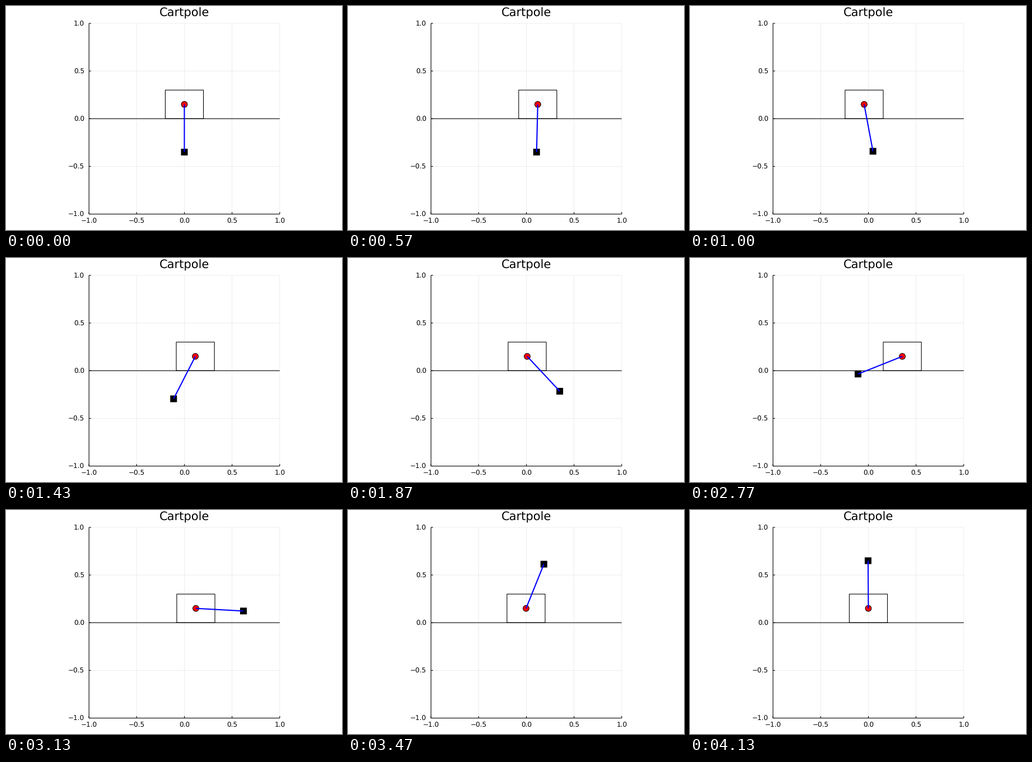
Recreate the animation shown at these times as a matplotlib script. Size 600 by 400 pixels, loop 4160 ms.

```python
import numpy as np
import matplotlib.pyplot as plt
from matplotlib.animation import FuncAnimation
from matplotlib.patches import Circle, Rectangle

plt.rcParams.update({"font.family": "DejaVu Sans", "text.hinting": "none",
                     "path.snap": False})

# Physics
CART, BOB, ROD, G = 1.0, 0.2, 0.5, 9.81
N, DT = 125, 1 / 30

# Via points of the swing-up: step, cart position, pole angle (0 = hanging)
NA = np.nan
VIA = np.array([
    (0, 0, 0), (17, .1195, -.025), (32, .027, NA), (43, .115, -.474),
    (48, .167, NA), (64, -.072, NA), (68, -.096, .261), (80, .255, -1.36),
    (83, .356, -1.182), (96, .153, 1.918), (104, -.004, 2.767),
    (112, -.037, 2.98), (124, 0, 3.149),
])


def solve_swing_up():
    """Least-effort cart and pole paths through the via points."""
    start, fixed, goal, tol = [], [], [], []
    for col, tolerance in ((1, .002), (2, .008)):
        known = VIA[~np.isnan(VIA[:, col])]
        steps = known[:, 0].astype(int)
        start.append(np.interp(np.arange(N), steps, known[:, col]))
        fixed.append(steps + (col - 1) * N)
        goal.append(known[:, col])
        tol.append(np.full(len(steps), tolerance))
    z, fixed, goal, tol = map(np.concatenate, (start, fixed, goal, tol))

    def rates(q):
        p = np.pad(q, ((1, 1), (0, 0)), mode="reflect")  # at rest at both ends
        return ((p[2:] - p[:-2]) / (2 * DT),
                (p[2:] - 2 * p[1:-1] + p[:-2]) / DT**2)

    def residual(z, weight):
        th = z[N:]
        s, c = np.sin(th), np.cos(th)
        _, acc = rates(z[:N])
        omega, alpha = rates(th)
        swing = ROD * alpha + acc * c + G * s
        force = (CART + BOB) * acc + BOB * ROD * (alpha * c - omega**2 * s)
        return np.concatenate([weight * swing, .05 * force,
                               (z[fixed] - goal[:, None]) / tol[:, None]])

    # Gauss-Newton with complex-step derivatives, tightening the dynamics
    eye = np.eye(2 * N)
    for i in range(70):
        weight = .05 * 400 ** min(i / 45, 1)
        r = residual(z[:, None], weight)[:, 0]
        jac = residual(z[:, None] + 1e-20j * eye, weight).imag / 1e-20
        lhs = np.vstack([jac, .3 * eye])
        rhs = np.concatenate([-r, np.zeros(2 * N)])
        step = np.linalg.lstsq(lhs, rhs, rcond=None)[0]
        z = z + step * min(1, .4 / max(np.abs(step).max(), 1e-9))
        if i > 46 and np.abs(step).max() < 1e-5:
            break
    return z[:N], z[N:]


cart_x, theta = solve_swing_up()

# Stage: one axes over the whole figure, in plot units
W, H, SCALE, CX, CY = 600, 400, 170.3, 318.5, 201.25
PX, PT = 1 / SCALE, 0.72
fig = plt.figure(figsize=(6, 4), dpi=100, facecolor="white")
ax = fig.add_axes([0, 0, 1, 1])
ax.set_xlim(-CX * PX, (W - CX) * PX)
ax.set_ylim((CY - H) * PX, CY * PX)
ax.axis("off")


def line(xs, ys, width=1.1, color="black", **kw):
    return ax.plot(xs, ys, color=color, lw=width * PT, scalex=False,
                   scaley=False, solid_capstyle="butt", **kw)[0]


def label(x, y, text, size, ha="center"):
    ax.text(x, y, text, size=size * PT, ha=ha, va="baseline")


ticks = np.linspace(-1, 1, 5)
for v in ticks:
    line([v, v], [-1, 1], .7, alpha=.1)
    line([-1, 1], [v, v], .7, alpha=.1)
line([-1, -1, 1], [1, -1, -1])
for v in ticks:
    line([v, v], [-1, -1 + 3.6 * PX])
    line([-1, -1 + 3.6 * PX], [v, v])
    text = f"{v:.1f}".replace("-", "\u2212")
    label(v, -1 - 16.2 * PX, text, 12)
    label(-1 - 8.4 * PX, v - 4.4 * PX, text, 12, "right")
label(0, (CY - 18.2) * PX, "Cartpole", 21)

PIVOT = .15
line([-1, 1], [0, 0])
box = line([], [])
rod = line([], [], 2.1, "blue")
side = 12 * PX
bob = ax.add_patch(Rectangle((0, 0), side, side, fc="black", ec="none"))
pin = ax.add_patch(Circle((0, PIVOT), 5.4 * PX, fc="red", ec="black", lw=PT))


def update(tick):
    k = (3 * 10 * tick + 10) // 100  # about 30 poses per second
    x, th = cart_x[k], theta[k]
    bx, by = x + ROD * np.sin(th), PIVOT - ROD * np.cos(th)
    box.set_data(x + np.array([-.2, .2, .2, -.2, -.2]), [0, 0, .3, .3, 0])
    rod.set_data([x, bx], [PIVOT, by])
    bob.set_xy((bx - side / 2, by - side / 2))
    pin.center = x, PIVOT
    return box, rod, bob, pin


anim = FuncAnimation(fig, update, frames=416, interval=10, repeat=True,
                     repeat_delay=0)
plt.show()
```
